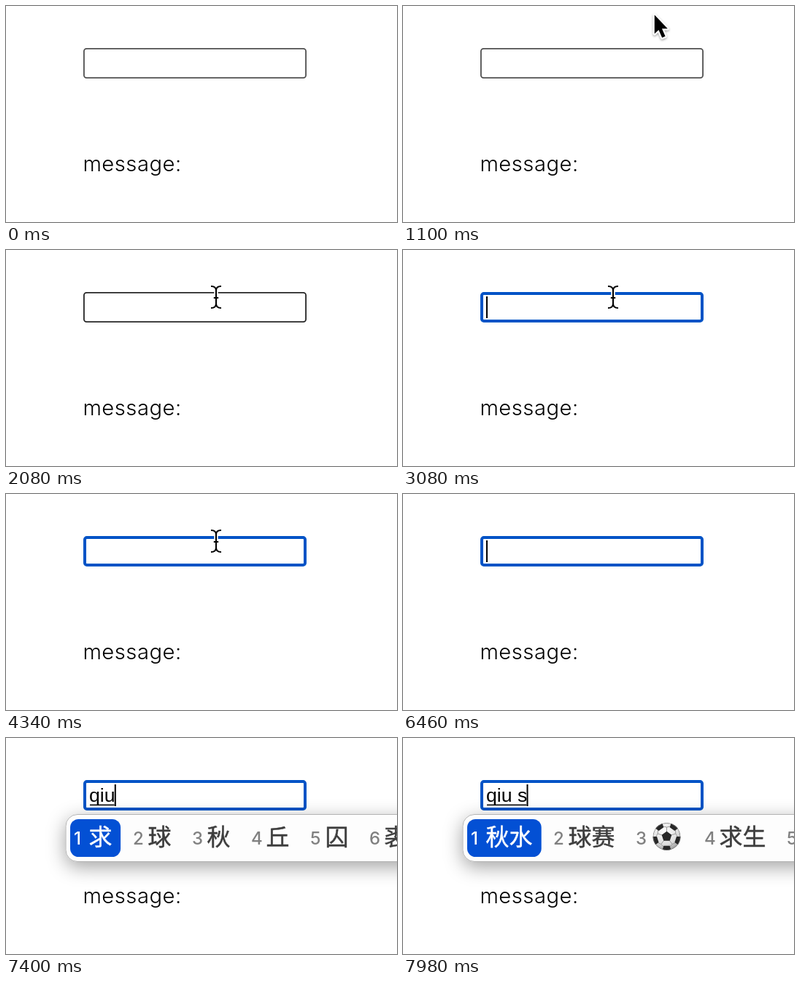
These frames come from a looping animation (536 by 298 pixels, 8000 ms). An HTML page:

```html
<!DOCTYPE html>
<html lang="en">
<head>
<meta charset="utf-8">
<title>Text input with a pinyin candidate window</title>
<style>
  html, body { margin: 0; width: 100%; height: 100%; overflow: hidden; background: #fff; }
  svg { display: block; width: 100vw; height: 100vh; }
  text { white-space: pre; }
  .label { font: 300 29.2px Inter, "Noto Sans", sans-serif; letter-spacing: .5px; fill: #000; }
  .typed { font: 26.67px "Liberation Sans", Arial, sans-serif; fill: #000; }
  .num { font: 500 24px Inter, sans-serif; fill: #808080; }
  .han { font: 500 32px "Noto Sans CJK SC", "Noto Sans CJK", sans-serif; fill: #3d3d3d; stroke: #3d3d3d; stroke-width: .5; }
  .chosen .num, .chosen .han { fill: #fff; }
  .chosen .han { stroke: #fff; }
</style>
</head>
<body>
<svg viewBox="0 0 536 298" preserveAspectRatio="none">
  <defs>
    <filter id="panelShadow" x="-10%" y="-80%" width="120%" height="280%">
      <feDropShadow dx="0" dy="7" stdDeviation="13" flood-color="#000" flood-opacity=".36"/>
    </filter>
    <filter id="arrowShadow" x="-40%" y="-40%" width="180%" height="180%">
      <feDropShadow dx="0" dy="1.5" stdDeviation="1.5" flood-color="#000" flood-opacity=".4"/>
    </filter>
    <radialGradient id="ballTone" cx=".42" cy=".3" r=".75">
      <stop offset="0" stop-color="#fff"/>
      <stop offset=".65" stop-color="#dedede"/>
      <stop offset="1" stop-color="#8e8e8e"/>
    </radialGradient>
    <clipPath id="ballEdge"><circle r="19"/></clipPath>
  </defs>

  <rect width="536" height="298" fill="#fff"/>
  <text class="label" x="105.4" y="228.3">message:</text>
  <rect id="field" fill="#fff"/>
  <text id="typed" class="typed" x="114" y="88"></text>
  <rect id="underline" x="115" y="91.6" height="1.6"/>
  <rect id="caret" y="64" width="2" height="30"/>

  <g id="panel">
    <rect x="82" y="105.5" width="700" height="65" rx="16" fill="#fdfdfd" stroke="#b4b4b4" filter="url(#panelShadow)"/>
    <rect id="pill" x="88" y="112" height="52" rx="11.5" fill="#0350d4"/>
    <g id="items"></g>
    <g id="ball" clip-path="url(#ballEdge)"></g>
  </g>

  <g id="arrow" filter="url(#arrowShadow)">
    <path d="M0 0V26L5.7 20.6L10.4 31.4L14.8 29.5L10.2 18.8H18Z" stroke="#fff" stroke-width="4" stroke-linejoin="round" paint-order="stroke"/>
  </g>
  <g id="beam" fill="none">
    <path id="beamHalo" stroke="#fff" stroke-width="5.4"/>
    <path id="beamLine" stroke="#000" stroke-width="2.1"/>
  </g>
</svg>
<script>
const LOOP = 8000;
const $ = id => document.getElementById(id);
const set = (el, attrs) => { for (const k in attrs) el.setAttribute(k, attrs[k]); };
const show = (el, on) => set(el, { visibility: on ? "visible" : "hidden" });

// Each key is [time, x, y].
const arrowPath = [[820, 520, 4], [960, 398, 5], [1100, 345, 12.3], [1260, 329, 26],
  [1420, 317, 39.3], [1560, 310, 47], [1640, 310, 47], [1700, 306, 54]];
const beamPath = [[1700, 305, 59], [1840, 295, 62], [2080, 288, 65]];

// Each key is [time, value]; the latest one holds.
const typing = [[0, ""], [6580, "q"], [6880, "qi"], [7300, "qiu"], [7820, "qiu s"]];
const choices = [
  [0, []],
  [6840, ["其", "去", "区", "清", "前", "奇"]],
  [6900, ["其", "起", "气", "期", "七", "器"]],
  [7320, ["求", "球", "秋", "丘", "囚", "裘"]],
  [7840, ["秋水", "球赛", "ball", "求生", "球色"]]
];
const held = (keys, t) => keys.filter(k => k[0] <= t).pop()[1];

function along(keys, t) {
  const last = keys.length - 1;
  if (t <= keys[0][0]) return keys[0].slice(1);
  if (t >= keys[last][0]) return keys[last].slice(1);
  const i = keys.findIndex(k => k[0] > t);
  const a = keys[i - 1], b = keys[i];
  const u = (t - a[0]) / (b[0] - a[0]);
  const slope = (j, c) => j === 0 || j === last ? 0
    : (keys[j + 1][c] - keys[j - 1][c]) / (keys[j + 1][0] - keys[j - 1][0]);
  return [1, 2].map(c => {
    const d = b[0] - a[0];
    const m0 = i === 1 ? (b[c] - a[c]) / d : slope(i - 1, c);
    const m1 = slope(i, c);
    return a[c] * (1 + 2 * u) * (1 - u) ** 2 + d * m0 * u * (1 - u) ** 2
      + b[c] * u * u * (3 - 2 * u) + d * m1 * u * u * (u - 1);
  });
}

function ngon(x, y, r, turn) {
  return "M" + [0, 1, 2, 3, 4].map(i => {
    const a = turn + i * Math.PI * 0.4;
    return `${x + r * Math.cos(a)} ${y + r * Math.sin(a)}`;
  }).join("L") + "Z";
}

function drawBall() {
  let patches = ngon(0, 0, 7.2, -Math.PI / 2), seams = "";
  for (let i = 0; i < 5; i++) {
    const a = -Math.PI / 2 + i * Math.PI * 0.4, b = a + Math.PI * 0.4;
    const at = (r, angle) => `${r * Math.cos(angle)} ${r * Math.sin(angle)}`;
    const mid = (a + b) / 2;
    patches += ngon(18.5 * Math.cos(mid), 18.5 * Math.sin(mid), 7, mid);
    seams += `M${at(7, a)}L${at(13, a)}L${at(15, a + 0.35)}M${at(13, a)}L${at(15, a - 0.35)}`;
  }
  $("ball").innerHTML = `<circle r="19" fill="url(#ballTone)"/>
    <path d="${seams}" fill="none" stroke="#999" stroke-width="1"/>
    <path d="${patches}" fill="#282828"/>
    <circle r="18.6" fill="none" stroke="#777" stroke-width=".8"/>`;
}

let shownList = null;
function drawChoices(list) {
  if (list === shownList) return;
  shownList = list;
  let x = 93.5, markup = "";
  $("ball").style.display = list.includes("ball") ? "" : "none";
  list.forEach((word, i) => {
    const isBall = word === "ball";
    markup += `<g${i ? "" : ' class="chosen"'}><text class="num" x="${x - 0.5}" y="147">${i + 1}</text>`;
    if (isBall) set($("ball"), { transform: `translate(${x + 42} 136)` });
    else markup += `<text class="han" x="${x + 20}" y="148">${word}</text>`;
    markup += "</g>";
    x += isBall ? 94 : 49 + 32 * word.length;
  });
  $("items").innerHTML = markup;
  if (list.length) set($("pill"), { width: 36.5 + 32.6 * list[0].length });
  $("panel").style.display = list.length ? "" : "none";
}

function drawField(t) {
  const focused = t >= 2940;
  const line = focused ? 4 : 1.8;
  const shade = Math.round(80 - 42 * Math.min(1, Math.max(0, (t - 1700) / 200)));
  set($("field"), {
    x: 106 + line / 2, y: 58 + line / 2, width: 306 - line, height: 42 - line,
    rx: focused ? 2.8 : 3.6, "stroke-width": line,
    stroke: focused ? "#0053c6" : `rgb(${shade},${shade},${shade})`
  });
}

function render(t) {
  drawField(t);
  const text = held(typing, t);
  $("typed").textContent = text;
  const width = text ? $("typed").getComputedTextLength() : 0;
  set($("underline"), { width: Math.max(0, width - 2) });
  set($("caret"), { x: 114 + (text ? width - 0.8 : 0) });
  show($("caret"), t >= 2940 && !(t >= 4340 && t < 5740));
  drawChoices(held(choices, t));

  show($("arrow"), t >= 820 && t < 1700);
  set($("arrow"), { transform: `translate(${along(arrowPath, t)})` });
  show($("beam"), t >= 1700 && t < 6460);
  set($("beam"), { transform: `translate(${along(beamPath, t)})` });
}

const beamShape = "M-7 -15Q0 -15 0 -9Q0 -15 7 -15M0 -10V10M-7 15Q0 15 0 9Q0 15 7 15M-3.2 1H3.2";
set($("beamHalo"), { d: beamShape });
set($("beamLine"), { d: beamShape });
drawBall();

const start = performance.now();
function tick() {
  render((performance.now() - start) % LOOP);
  requestAnimationFrame(tick);
}
tick();
</script>
</body>
</html>
```
